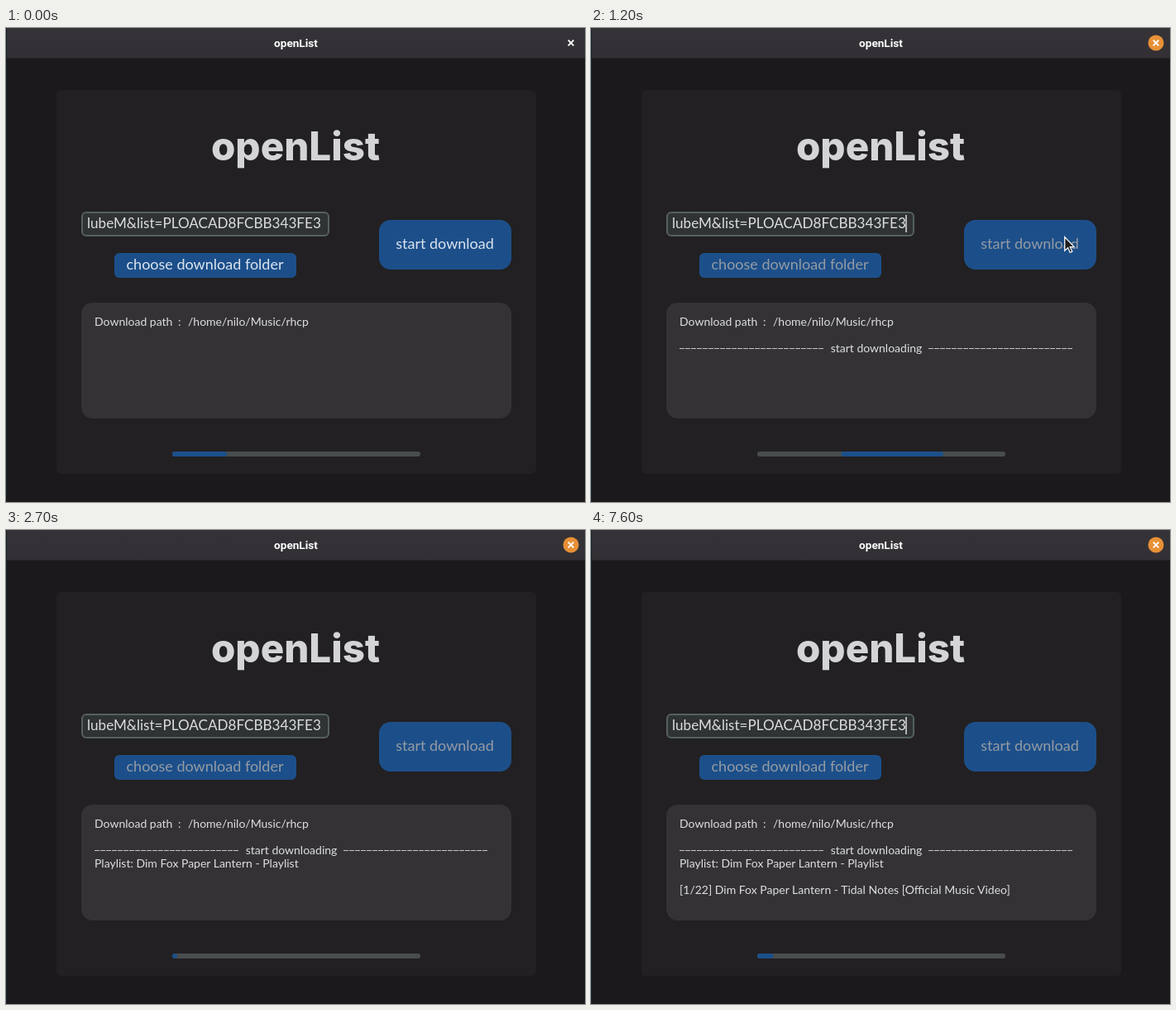
Recreate the animation shown at these times as an HTML page. Size 700 by 573 pixels, loop 8 s.

```html
<!DOCTYPE html>
<html lang="en">
<head>
<meta charset="utf-8">
<title>openList</title>
<style>
  html, body { margin: 0; width: 100%; height: 100%; overflow: hidden; background: #1b191c; }
  svg { display: block; width: 700px; height: 573px; }
  text { font: 18px Lato, sans-serif; fill: #dce4ee; white-space: pre; }
  .mid { text-anchor: middle; }
  .title { font: 700 13.6px Roboto, sans-serif; fill: #fff; }
  .brand { font: 800 47.5px Inter, sans-serif; fill: #d4d4d6; }
  .field { font-size: 17.1px; fill: #dcdedf; }
  .log text { font-size: 14px; fill: #dededf; }
  .log path { stroke: #c4c4c6; stroke-dasharray: 6 1; }
  .button { fill: #1c4f8a; }
  .hover #start { fill: #13355c; }
  .busy .label { fill: #959ba3; }
</style>
</head>
<body>
<svg id="app" viewBox="0 0 700 573">
  <defs>
    <linearGradient id="bar" x2="0" y2="1">
      <stop stop-color="#353337"/><stop offset="1" stop-color="#323034"/>
    </linearGradient>
  </defs>
  <rect width="700" height="573" fill="#1b191c"/>
  <rect width="700" height="37" fill="url(#bar)"/>
  <path d="M0 36.5H700" stroke="#252427"/>
  <path d="M.5 0V573" stroke="#14212b"/>
  <text class="title mid" x="350.5" y="23">openList</text>
  <circle id="close" cx="683" cy="18" r="9.5" fill="#e79036"/>
  <path d="M679.7 14.7l6.6 6.6m0-6.6l-6.6 6.6" stroke="#fff" stroke-width="1.9"/>

  <rect x="61" y="75" width="580" height="464" rx="6" fill="#222022"/>
  <text class="brand mid" x="350" y="160">openList</text>

  <rect x="92" y="223" width="298" height="28" rx="5" fill="#2f3333" stroke="#566060" stroke-width="2"/>
  <text class="field" x="98" y="242">lubeM&amp;list=PLOACAD8FCBB343FE3</text>
  <path id="caret" d="M381 226V247" stroke="#dcdedf" stroke-width="1.5"/>

  <rect class="button" x="131" y="272" width="220" height="30" rx="6"/>
  <text class="label mid" x="240.5" y="292">choose download folder</text>
  <rect id="start" class="button" x="451" y="232" width="160" height="60" rx="14"/>
  <text class="label mid" x="530.5" y="267">start download</text>

  <rect x="91" y="332" width="520" height="140" rx="14" fill="#343235"/>
  <g class="log">
    <text y="360"><tspan x="107">Download path</tspan><tspan x="208">:</tspan><tspan x="220">/home/nilo/Music/rhcp</tspan></text>
    <g id="begun">
      <path d="M107 387.5H282M408 387.5H583"/>
      <text class="mid" x="345" y="392">start downloading</text>
    </g>
    <text id="playlist" x="107" y="408">Playlist: Dim Fox Paper Lantern - Playlist</text>
    <text id="track" x="107" y="440">[1/22] Dim Fox Paper Lantern - Tidal Notes [Official Music Video]</text>
  </g>

  <rect x="201" y="512" width="300" height="6" rx="3" fill="#4a4d4e"/>
  <rect id="chunk" y="512" height="6" rx="3" fill="#1c4f8a"/>
  <path id="cursor" d="M.7 .7V17.2L4.6 13.6L7.2 19.4L9.8 18.2L7.2 12.6H12.2Z" fill="#1b1a1d" stroke="#f2f2f2" stroke-width="1.3"/>
</svg>
<script>
const LOOP = 8000, STEP = 100;
const CLICK = 1200, LISTED = 2100, TRACK = 5700;
const caretOn = [[1200, 1800], [2100, 2700], [3500, 3800], [4000, 4600],
                 [4900, 5700], [5800, 6400], [6700, 7300], [7600, 8000]];
const pointer = [[900, 622, 265], [1100, 572, 252], [1700, 572, 252], [2100, 705, 268]];

const $ = id => document.getElementById(id);
const show = (id, on) => $(id).setAttribute('visibility', on ? 'visible' : 'hidden');
const clamp = v => Math.max(0, Math.min(1, v));

// Start and end of the filled part, as fractions of the bar
function progress(t) {
  if (t >= TRACK) return [0, 1 / 22];
  if (t >= LISTED) return [0, 0];
  const phase = 0.14 + t * 2 * Math.PI / 1600 - (t >= CLICK ? 0.23 : 0);
  const mid = (1 - Math.cos(phase)) / 2;
  return [clamp(mid - 0.2), clamp(mid + 0.2)];
}

function pointerAt(t) {
  const i = pointer.findIndex(p => p[0] > t);
  if (i < 1) return null;
  const [t0, x0, y0] = pointer[i - 1], [t1, x1, y1] = pointer[i];
  const k = (t - t0) / (t1 - t0);
  return [x0 + (x1 - x0) * k, y0 + (y1 - y0) * k];
}

function draw(t) {
  const busy = t >= CLICK;
  $('app').classList.toggle('hover', t >= 900 && !busy);
  $('app').classList.toggle('busy', busy);
  show('close', busy);
  show('begun', busy);
  show('playlist', t >= LISTED);
  show('track', t >= TRACK);
  show('caret', caretOn.some(([a, b]) => t >= a && t < b));

  const [from, to] = progress(t);
  $('chunk').setAttribute('x', 201 + 294 * from);
  $('chunk').setAttribute('width', 6 + 294 * (to - from));

  const at = pointerAt(t);
  show('cursor', at);
  if (at) $('cursor').setAttribute('transform', `translate(${at})`);
}

const origin = performance.now();
function tick() {
  const t = (performance.now() - origin) % LOOP;
  draw(Math.floor(t / STEP) * STEP);
  requestAnimationFrame(tick);
}
tick();
</script>
</body>
</html>
```
